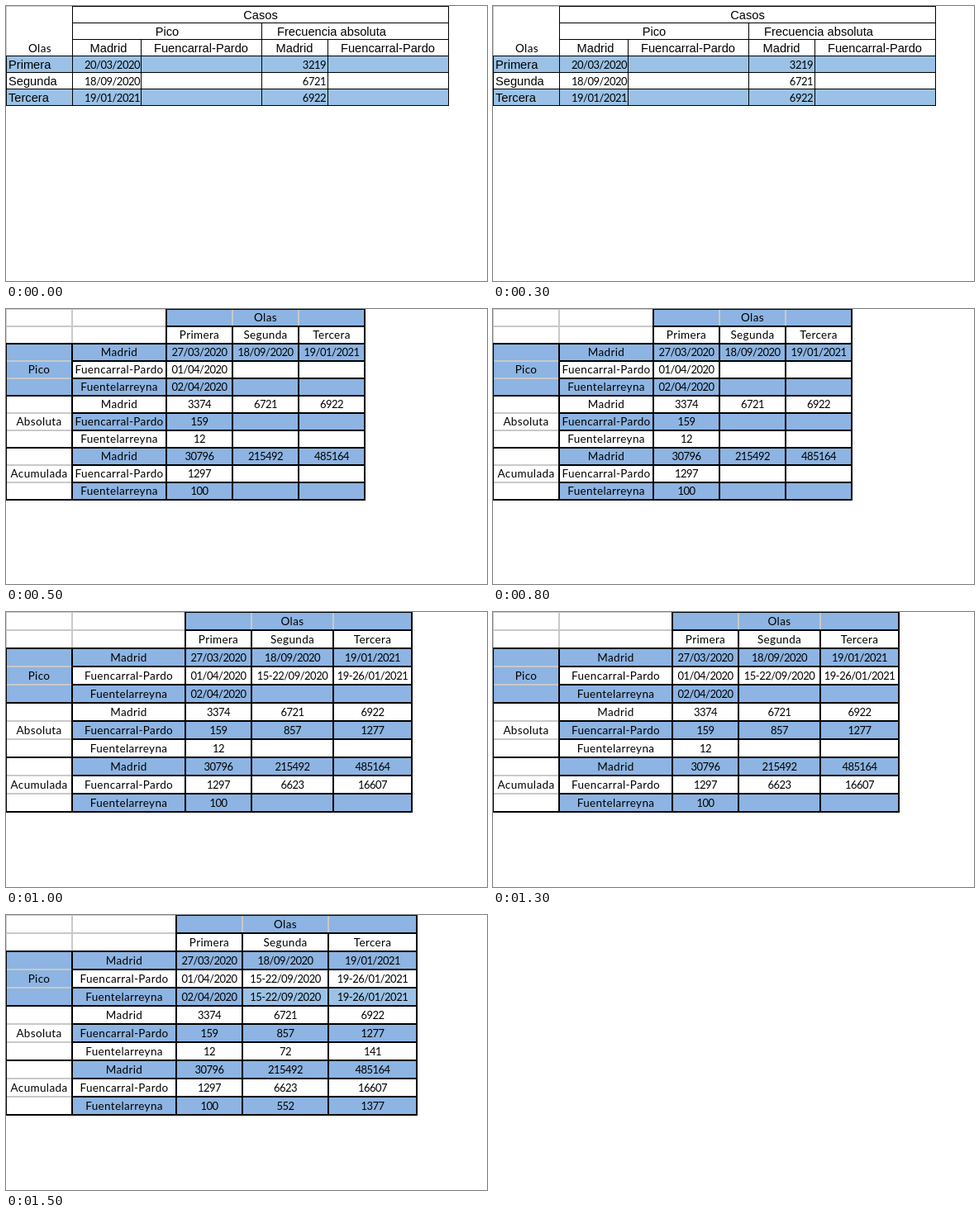
An HTML page with a canvas for the animation above (2000 ms loop, 582 by 333 pixels).

```html
<!DOCTYPE html>
<html lang="es">
<head>
<meta charset="utf-8">
<style>
  html, body { margin: 0; width: 100%; height: 100%; overflow: hidden; background: #fff; }
  canvas { display: block; }
</style>
</head>
<body>
<canvas id="stage" width="582" height="333"></canvas>
<script>
const ctx = document.getElementById('stage').getContext('2d');
const SLIDE_MS = 500;
const BLACK = '#000', GREY = '#c9c9c9', BLUE = '#8db4e2', PALE_BLUE = '#9bc2e6';
const ARIAL = { font: '14.67px "Liberation Sans", Arial, sans-serif', spacing: '0px' };
const WORDS = { font: '13.5px Lato, sans-serif', spacing: '0.35px' };
const DIGITS = { font: '13px Lato, sans-serif', spacing: '-0.5px' };

function rect(x, y, w, h, color) {
  ctx.fillStyle = color;
  ctx.fillRect(x, y, w, h);
}

function label(text, x, baseline, align = 'center', style = /^\d/.test(text) ? DIGITS : WORDS) {
  ctx.font = style.font;
  ctx.letterSpacing = style.spacing;
  ctx.textAlign = align;
  ctx.fillStyle = BLACK;
  ctx.fillText(text, x, baseline);
}

const hLine = (x1, x2, y, color, weight) => rect(x1, y, x2 - x1 + weight, weight, color);
const vLine = (x, y1, y2, color, weight) => rect(x, y1, weight, y2 - y1 + weight, color);

function drawSummary() {
  const waves = [['Primera', '20/03/2020', '3219'], ['Segunda', '18/09/2020', '6721'], ['Tercera', '19/01/2021', '6922']];
  rect(0, 60, 535, 20, PALE_BLUE);
  rect(0, 100, 535, 20, PALE_BLUE);
  hLine(0, 80, 0, GREY, 1);
  vLine(0, 0, 60, GREY, 1);
  for (const y of [0, 20, 40]) hLine(80, 535, y, BLACK, 1);
  for (const y of [60, 80, 100, 120]) hLine(0, 535, y, BLACK, 1);
  for (const [x, top] of [[80, 0], [163, 40], [309, 20], [389, 40], [535, 0]]) vLine(x, top, 120, BLACK, 1);
  vLine(0, 60, 120, BLACK, 1);

  label('Casos', 308, 16, 'center', ARIAL);
  label('Pico', 195, 36, 'center', ARIAL);
  label('Frecuencia absoluta', 394, 36, 'center', ARIAL);
  label('Olas', 41, 56);
  for (const [city, district] of [[124, 236], [349, 462]]) {
    label('Madrid', city, 56, 'center', ARIAL);
    label('Fuencarral-Pardo', district, 56, 'center', ARIAL);
  }
  waves.forEach(([name, date, count], i) => {
    const y = 76 + 20 * i;
    label(name, 3, y, 'left', ARIAL);
    label(date, 162, y, 'right');
    label(count, 387, y, 'right');
  });
}

const places = ['Madrid', 'Fuencarral-Pardo', 'Fuentelarreyna'];
const first = ['27/03/2020', '01/04/2020', '02/04/2020', '3374', '159', '12', '30796', '1297', '100'];
const second = ['18/09/2020', '15-22/09/2020', '15-22/09/2020', '6721', '857', '72', '215492', '6623', '552'];
const third = ['19/01/2021', '19-26/01/2021', '19-26/01/2021', '6922', '1277', '141', '485164', '16607', '1377'];

// The first `known` places of each group have figures for the later waves.
function drawDetail(cols, pitch, known) {
  const [left, a, b, c, d, right] = cols;
  const lineY = i => i * pitch - 1;
  const end = lineY(11);
  const fill = (x1, x2, row, rows, color) => rect(x1, row * pitch, x2 - x1, rows * pitch, color);

  fill(b, right, 0, 1, BLUE);
  fill(left, a, 2, 3, BLUE);
  for (let i = 2; i < 11; i += 2) fill(a, right, i, 1, BLUE);
  if (known === 3) fill(c, right, 4, 1, PALE_BLUE);

  for (const i of [0, 1]) hLine(left, b, lineY(i), GREY, 2);
  for (const i of [3, 4, 6, 7, 9, 10]) hLine(left, a, lineY(i), GREY, 2);
  for (const x of [left, a]) vLine(x, 0, lineY(2), GREY, 2);
  for (const x of [c, d]) vLine(x, 0, lineY(1), GREY, 2);

  for (const i of [0, 1]) hLine(b, right, lineY(i), BLACK, 2);
  for (let i = 2; i < 12; i++) hLine((i - 2) % 3 ? a : left, right, lineY(i), BLACK, 2);
  for (const x of [left, a]) vLine(x, lineY(2), end, BLACK, 2);
  for (const x of [b, right]) vLine(x, 0, end, BLACK, 2);
  for (const x of [c, d]) vLine(x, lineY(1), end, BLACK, 2);

  const cell = (text, x1, x2, row) =>
    label(text, (x1 + x2) / 2 + 1, row * pitch + Math.floor(pitch / 2) + 5);
  cell('Olas', c, d, 0);
  cell('Primera', b, c, 1);
  cell('Segunda', c, d, 1);
  cell('Tercera', d, right, 1);
  ['Pico', 'Absoluta', 'Acumulada'].forEach((name, i) => cell(name, left, a, 3 + 3 * i));
  first.forEach((value, i) => {
    cell(places[i % 3], a, b, i + 2);
    cell(value, b, c, i + 2);
    if (i % 3 < known) {
      cell(second[i], c, d, i + 2);
      cell(third[i], d, right, i + 2);
    }
  });
}

const slides = [
  drawSummary,
  () => drawDetail([-1, 79, 193, 273, 353, 433], 21, 1),
  () => drawDetail([-1, 79, 216, 296, 395, 490], 22, 2),
  () => drawDetail([-1, 79, 205, 285, 389, 496], 22, 3),
];

function frame() {
  rect(0, 0, 582, 333, '#fff');
  slides[Math.floor(performance.now() / SLIDE_MS) % slides.length]();
  requestAnimationFrame(frame);
}
frame();
</script>
</body>
</html>
```
